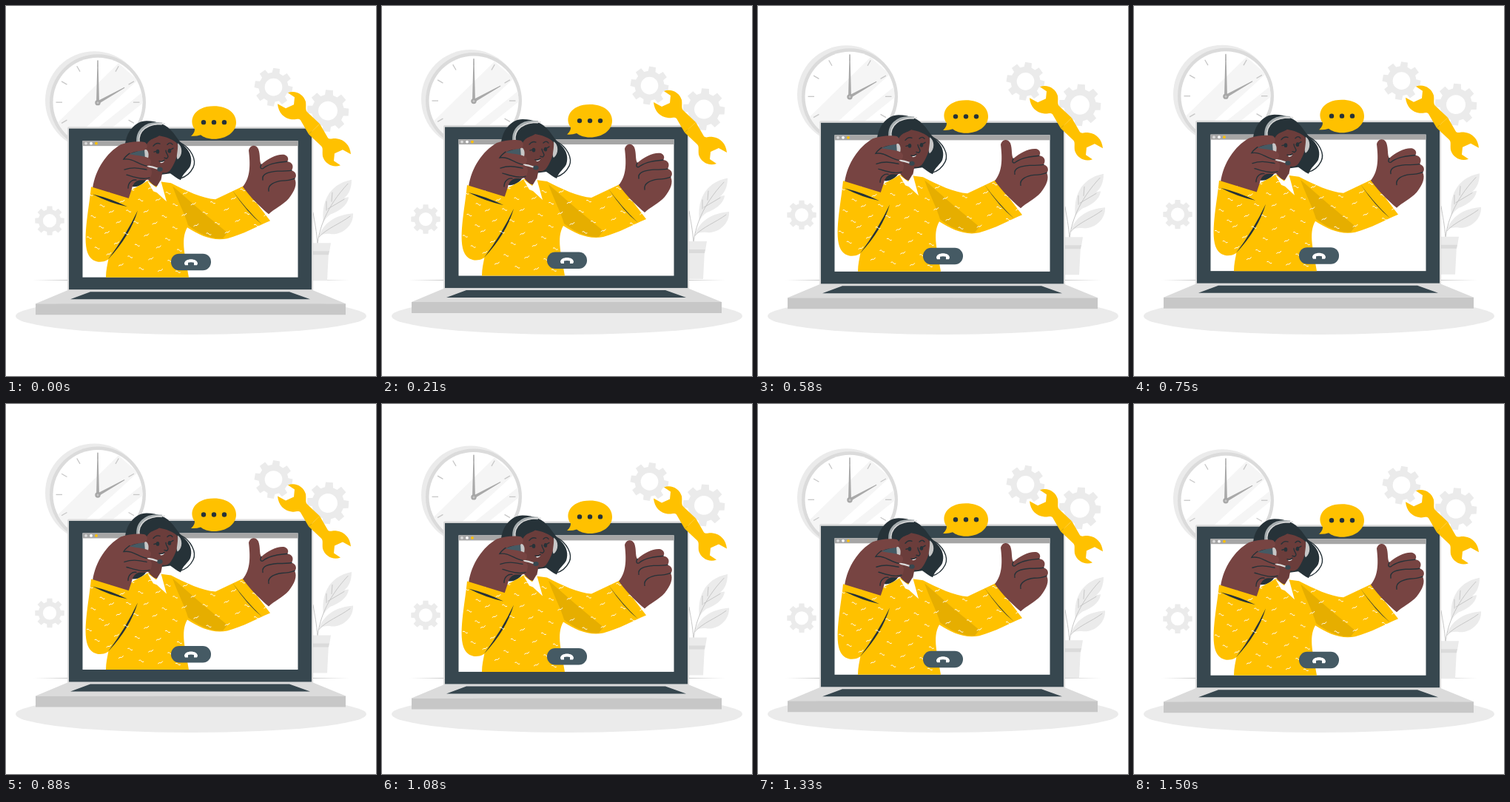
An HTML page that plays this animation: 500 px wide and 500 px high, repeating every 1.54 s.

```html
<!DOCTYPE html>
<html lang="en">
<head>
<meta charset="utf-8">
<title>Video call support</title>
<style>
  html, body { margin: 0; width: 100%; height: 100%; overflow: hidden; background: #fff; }
  svg { display: block; width: 100%; height: 100%; }
  .pale { fill: #ebebeb; }
  .yellow { fill: #ffc100; }
  .slate { fill: #37474f; }
  .ink { fill: #263238; }
  .hand { fill: #774442; }
  .face { fill: #6b3d3b; }
  .line { fill: none; stroke: #263238; stroke-width: 1.4; stroke-linecap: round; }
  .vein { fill: none; stroke: #c7c7c7; stroke-width: 1; stroke-linecap: round; }
</style>
</head>
<body>
<svg viewBox="0 0 500 500">
  <defs>
    <clipPath id="dial"><circle cx="124" cy="130" r="60.5"/></clipPath>
    <clipPath id="shirt"><use href="#torso"/><use href="#sleeve"/></clipPath>
    <path id="halfWrench" d="M381 117C391 113 402 119 405 129C406 136 404 140 407 143L424 159L409 173L398 154C395 151 392 154 386 153C376 152 368 144 367 132L378 138L389 133L390 123Z"/>
  </defs>

  <ellipse class="pale" cx="250" cy="419" rx="237" ry="25"/>
  <path d="M36 370.500L84 370V371ZM464 370.500L413 370V371Z" fill="#c7c7c7"/>

  <g id="scene">
    <g id="clock">
      <circle class="pale" cx="119.500" cy="127.500" r="66.500"/>
      <circle cx="124" cy="130" r="65" fill="#dbdbdb"/>
      <circle cx="124" cy="130" r="60.500" fill="#fff"/>
      <path clip-path="url(#dial)" fill="#f5f5f5" d="M60 167L152 77L178 100L84 186ZM92 190L190 112L196 122L104 196Z"/>
      <g id="ticks" stroke="#c7c7c7" stroke-width="1.300"/>
      <path fill="#a9a9a9" d="M122 131L123.500 73H124.500L126 131ZM123 128.500L160 109.500L160.300 110.500L125 132Z"/>
      <circle cx="124" cy="130.500" r="3.700" fill="#a6a6a6"/>
      <circle cx="124" cy="130.500" r="1.500" fill="#c7c7c7"/>
    </g>

    <g id="gears" class="pale" fill-rule="evenodd"/>

    <g id="plant">
      <path class="pale" d="M429 292C426 268 434 241 467 234.500C467 245 464 254 457 259L463 258C462 270 448 278 439 281C434 284 431 288 429 292ZM423 310C431 290 448 282 469 280C470 296 455 309 440 308C433 307 428 308 423 310Z"/>
      <path class="vein" d="M421 322C423 302 432 272 462 240M433 276L433 264M440 264L441 252M435 274L457 261M423 312C434 300 450 295 465 284M421 322C420 305 417 292 415 279"/>
      <path class="pale" d="M400 320H439L437 332H436L434 371H400Z"/>
      <path fill="#dbdbdb" d="M400 331H437L436 336H400Z"/>
    </g>

    <g id="laptop">
      <rect x="83" y="163" width="332" height="222" rx="2" fill="#dbdbdb"/>
      <rect class="slate" x="85" y="165.500" width="328" height="217.500"/>
      <rect x="103.500" y="182" width="291" height="184.500" fill="#fff"/>
      <rect x="103.500" y="182" width="291" height="7" fill="#a6a6a6"/>
      <circle cx="108" cy="185.500" r="1.900" fill="#dbdbdb"/>
      <circle cx="115" cy="185.500" r="1.900" fill="#fff"/>
      <circle class="yellow" cx="122" cy="185.500" r="1.900"/>
      <path fill="#dbdbdb" d="M83 384H415L459 402H40Z"/>
      <path class="slate" d="M114 386H383L411 396H87Z"/>
      <path fill="#c7c7c7" d="M40 402H459V417H40Z"/>
    </g>

    <g class="yellow">
      <use href="#halfWrench"/>
      <use href="#halfWrench" transform="rotate(180 416.500 166)"/>
    </g>

    <g id="woman">
      <path class="ink" d="M161 188C162 171 174 155 190 155C205 155 217 160 226 171C232 179 236 185 242 190C250 198 252 207 249 216C246 222 239 226 236 235C231 233 227 229 222 226L192 230C189 238 181 245 171 244Z"/>
      <path class="line" stroke-width="1" d="M236 185C250 192 258 208 253 218C249 226 243 231 235 233"/>

      <path id="torso" class="yellow" d="M160 256C170 246 181 243 191 236L208 237L223 239C242 249 266 260 283 261L321 243L357 290C338 298 321 308 299 314C280 318 262 310 245 299C235 316 243 340 247 366.500H135C135 357 137 349 139 339Z"/>
      <path fill="#e6ae00" d="M225 243Q262 276 299 306L293 314C275 315 259 306 246 296C242 281 231 261 225 243Z"/>

      <path class="hand" d="M320 244C331 231 330 212 328 195C330 187 338 187 341 193C344 201 342 209 345 214C354 206 368 199 377 201C382 203 382 208 380 210C388 211 389 217 386 222C393 224 393 231 390 233C394 240 390 250 382 260C374 269 362 274 355 281C343 271 331 259 320 244Z"/>
      <path class="line" d="M345 214C342 220 346 221 349 218C358 212 370 211 380 210M347 235C345 226 356 224 367 223C374 223 380 223 386 222M355 250C353 241 364 237 373 236C380 236 385 235 390 233"/>
      <path class="ink" d="M306 249Q324 274 346 295Q326 279 306 249Z"/>

      <path class="face" d="M190 212L212 222L209 237C207 247 200 245 191 233Z"/>
      <path fill="#fff" d="M191 236L203 245L209 235L217 264L204 252L199 250Z"/>
      <path class="face" d="M187 197C188 184 199 175 210 173C221 175 230 180 232 187C234 198 229 211 223 220C219 227 211 226 204 223L190 218Z"/>
      <path class="ink" d="M186 192C190 180 199 180 207 175C216 177 226 179 234 188C230 172 216 160 205 158L181 174Z"/>

      <g id="features">
        <path class="line" stroke-width="1.800" d="M199 189Q203 184 208 186M218 187Q222 183 225 187"/>
        <path class="line" d="M200 197L204 196M219 196L226 192M216 195C216 200 222 203 217 206L214 205"/>
        <ellipse class="ink" cx="205" cy="196.500" rx="2.300" ry="2.900"/>
        <ellipse class="ink" cx="221" cy="195.500" rx="2.200" ry="2.900"/>
        <path fill="#fff" d="M208 210Q211 211 214 209Q213 212 209 212Z"/>
        <path class="line" stroke-width="1" d="M207 209.500Q211 211 214 208"/>
      </g>

      <g id="headset">
        <path d="M179 190C174 169 188 156 211 159" fill="none" stroke="#a6adaf" stroke-width="3.500"/>
        <path d="M180 185C178 169 190 158 215 159" fill="none" stroke="#dbdbdb" stroke-width="1.500"/>
        <path fill="#c7c7c7" d="M232 185C239 189 239 202 232 207C229 204 233 196 232 185Z"/>
        <path fill="#455a64" d="M165 200L184 194C190 193 193 199 191 208L167 205Z"/>
        <path fill="#c7c7c7" d="M187 193C193 193 194 202 191 208L188 207Z"/>
        <path d="M190 216Q198 217 206 220" fill="none" stroke="#dbdbdb" stroke-width="2.200"/>
        <ellipse class="slate" cx="208" cy="220.500" rx="3.700" ry="3"/>
      </g>

      <path class="hand" d="M117 246C121 220 136 198 155 187C166 183 181 182 188 184C193 188 191 194 185 195C178 196 172 196 167 200C179 202 192 203 195 207C198 212 194 216 190 216C197 219 199 223 195 232C192 236 187 235 182 235C175 235 171 241 170 247L165 262Z"/>
      <path class="line" d="M167 199C163 202 160 205 159 207C171 205 179 214 190 216M160 221C172 217 179 219 190 221M163 228C174 231 184 235 194 232M165 246C165 238 171 234 176 235"/>
      <path id="sleeve" class="yellow" d="M115 244L167 260L179 274C169 300 156 323 145 336C136 348 119 349 112 337C102 319 112 276 115 244Z"/>
      <path class="ink" d="M117 254Q142 260 164 271Q140 266 117 254ZM138 342Q162 310 178 276Q168 310 138 342Z"/>
      <path id="pattern" clip-path="url(#shirt)" fill="none" stroke="#fff" stroke-linecap="round"/>
    </g>

    <g id="bubble">
      <path class="yellow" d="M250 175.500C254 172 255 169 255 166C246 154 254 135 281 135C300 135 311 145 311 157C311 170 298 179.500 281 179.500C273 179.500 267 177 263 174Q257 176 250 175.500Z"/>
      <g class="ink">
        <circle cx="267" cy="157" r="3.200"/><circle cx="281" cy="157" r="3.200"/><circle cx="295" cy="157" r="3.200"/>
      </g>
    </g>

    <g id="hangUp">
      <rect x="223" y="334.500" width="54" height="22.500" rx="11" fill="#455a64"/>
      <path fill="#fff" d="M241 348C241 340 259 340 259 348L258 350H254V346.500Q250 345.500 246 346.500V350H242Z"/>
    </g>
  </g>
</svg>
<script>
const PERIOD = 1540, PHASE = 45, AMPLITUDE = 4.3;
const byId = id => document.getElementById(id);

function gearPath(cx, cy, radius, turn, teeth = 8) {
  const root = radius * 0.77, hole = radius * 0.455, step = 2 * Math.PI / teeth;
  const corners = [[-0.32, root], [-0.22, radius], [0.22, radius], [0.32, root]];
  const points = [];
  for (let i = 0; i < teeth; i++) {
    for (const [offset, r] of corners) {
      const angle = turn + (i + offset) * step;
      points.push(`${cx + r * Math.cos(angle)} ${cy + r * Math.sin(angle)}`);
    }
  }
  return `M${points.join("L")}Z M${cx - hole} ${cy}a${hole} ${hole} 0 1 0 ${2 * hole} 0a${hole} ${hole} 0 1 0 ${-2 * hole} 0Z`;
}

byId("gears").setAttribute("transform", "translate(0 0)");
byId("gears").innerHTML = `<path d="${
  gearPath(361.5, 109.5, 26, 0.16) + gearPath(435, 141.5, 28.5, 0.07) + gearPath(59, 290, 20, 0)}"/>`;

byId("ticks").innerHTML = Array.from({ length: 12 }, (_, i) =>
  `<path d="M172 130H180.5" transform="rotate(${i * 30} 124 130)"/>`).join("");

// Shirt squiggles: a staggered, slightly jittered grid clipped to the fabric
let squiggles = "";
for (let row = 0; row < 8; row++) {
  for (let col = 0; col < 10; col++) {
    const n = row * 10 + col;
    const x = 114 + col * 26 + (row % 2) * 13 + 4 * Math.sin(n * 7);
    const y = 250 + row * 15 + 4 * Math.cos(n * 5);
    squiggles += `M${x - 3} ${y}` + (n % 2 ? "q2 -2 3 -1t3 -2" : "q2 -1 3 1t3 1");
  }
}
byId("pattern").setAttribute("d", squiggles);

const scene = byId("scene");
const lift = t => AMPLITUDE * (Math.cos(2 * Math.PI * (t + PHASE) / PERIOD) - 0.95);

function draw() {
  scene.setAttribute("transform", `translate(0 ${lift(performance.now() % PERIOD)})`);
  requestAnimationFrame(draw);
}
draw();
</script>
</body>
</html>
```
